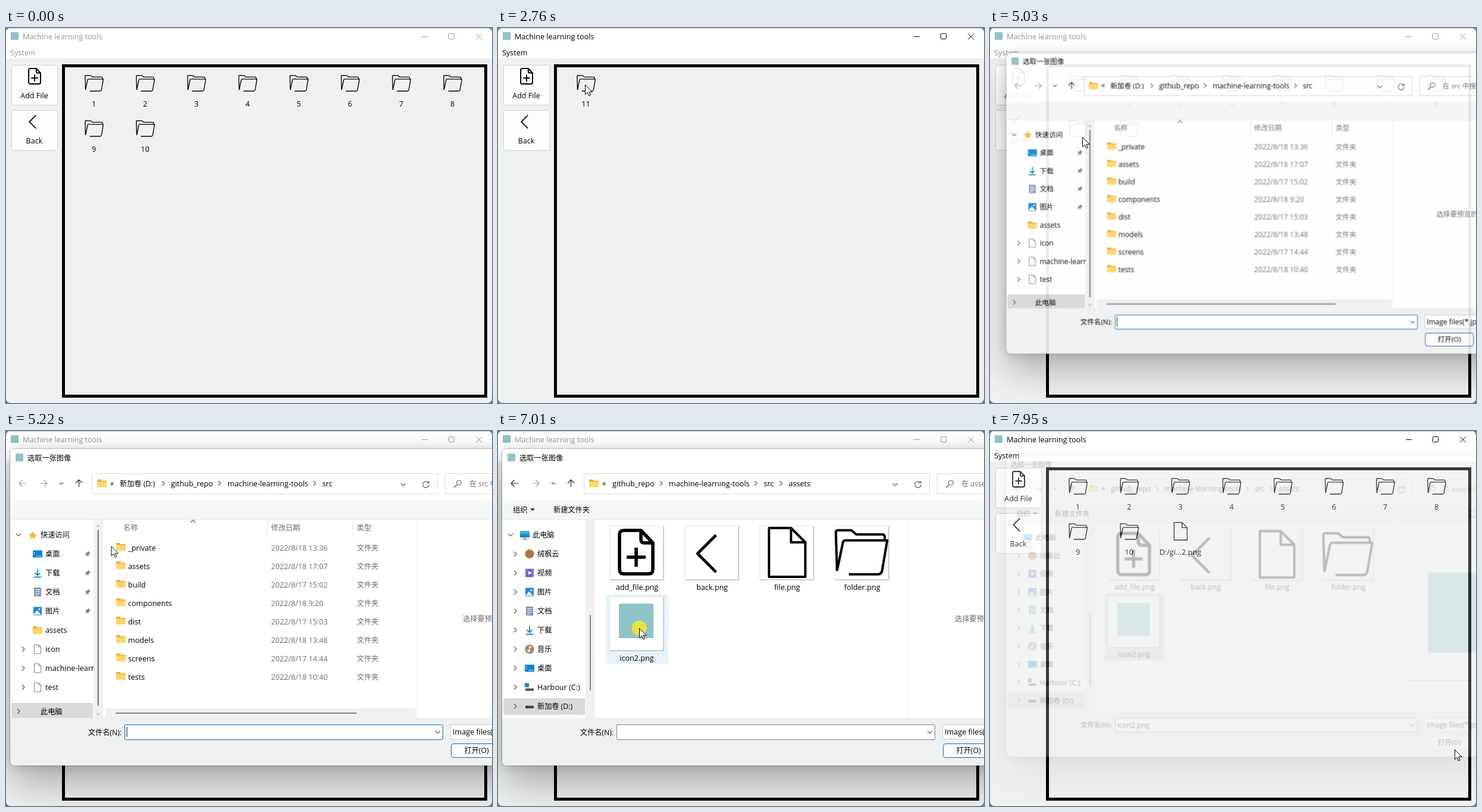
An HTML page that plays this animation: 816x630 px, repeating every 8000 ms.

```html
<!DOCTYPE html>
<html lang="zh-CN">
<head>
<meta charset="utf-8">
<title>Machine learning tools</title>
<style>
html, body { margin: 0; width: 100%; height: 100%; overflow: hidden; background: #71808c; }
#stage { position: relative; width: 100%; height: 100%; overflow: hidden; contain: strict; }
svg { position: absolute; left: 0; top: 0; display: block; }
text { font: 12.6px "Open Sans", "Noto Sans CJK SC", "Noto Sans CJK", sans-serif; fill: #000; white-space: pre; }
text.cjk { font-size: 12.2px; }
text.mid { text-anchor: middle; }
text.end { text-anchor: end; }
text.soft { fill: #6d6d6d; }
.line { fill: none; stroke: #000; stroke-linejoin: round; }
.thin { fill: none; stroke: #5c5c5c; stroke-width: 1.2; }
#win { position: absolute; width: 816px; height: 630px; border-radius: 8px; overflow: hidden; background: #eff1f1; }
#dialog {
  position: absolute; left: 7px; top: 30px; width: 960px; height: 532px;
  border-radius: 8px; overflow: hidden; background: #fff;
  box-shadow: 0 0 0 1px rgba(0,0,0,.2), 0 2px 21px rgba(0,0,0,.17), 0 32px 64px rgba(0,0,0,.28);
  transform-origin: 407px 236px;
}

/* One loop is 8 s, so 1% is 80 ms. */
#dialog, .anim { animation: 8s step-end infinite; }
#dialog { animation-name: dialog; }
@keyframes dialog {
  0% { opacity: 0; transform: scale(.9); }
  62% { opacity: .5; transform: scale(.92); }
  62.875% { opacity: .93; transform: scale(.95); }
  63.75% { opacity: 1; transform: scale(.985); }
  64.5% { opacity: 1; transform: none; }
  98.5% { opacity: .6; transform: scale(.97); }
  99.375% { opacity: .23; transform: scale(.95); }
}
.active { animation-name: active; }
@keyframes active { 0% { opacity: .42; } 8% { opacity: 1; } 61.25% { opacity: .42; } 98.5% { opacity: 1; } }
.top { animation-name: top; }
@keyframes top { 0% { opacity: 1; } 33% { opacity: 0; } 46.125% { opacity: 1; } }
.sub { animation-name: sub; }
@keyframes sub { 0% { opacity: 0; } 33% { opacity: 1; } 46.125% { opacity: 0; } }
.done { animation-name: done; }
@keyframes done { 0% { opacity: 0; } 98.5% { opacity: 1; } }
.undone { animation-name: undone; }
@keyframes undone { 0% { opacity: 1; } 98.5% { opacity: 0; } }
.add { animation-name: add; }
@keyframes add {
  0% { fill: #fdfdfd; stroke: #d0d0d0; }
  52% { fill: #e0eef9; stroke: #0078d4; }
  57.75% { fill: #cce4f7; stroke: #005499; }
  58.7% { fill: #e0eef9; stroke: #0078d4; }
  62% { fill: #fdfdfd; stroke: #d0d0d0; }
}
.back { animation-name: back; }
@keyframes back {
  0% { fill: #fdfdfd; stroke: #d0d0d0; }
  39.25% { fill: #e0eef9; stroke: #0078d4; }
  45.375% { fill: #cce4f7; stroke: #005499; }
  46.25% { fill: #e0eef9; stroke: #0078d4; }
  52% { fill: #fdfdfd; stroke: #d0d0d0; }
}
.early { animation-name: early; }
@keyframes early { 0% { opacity: 1; } 65.4% { opacity: 0; } }
.ready { animation-name: ready; }
@keyframes ready { 0% { opacity: 0; } 65.4% { opacity: 1; } }
.src { animation-name: src; }
@keyframes src { 0% { opacity: 1; } 79.375% { opacity: 0; } }
.assets { animation-name: assets; }
@keyframes assets { 0% { opacity: 0; } 79.375% { opacity: 1; } }
.caret { animation-name: caret; }
@keyframes caret { 0% { opacity: 1; } 69.5% { opacity: 0; } }
.row { animation-name: row; }
@keyframes row { 0% { opacity: 0; } 70% { opacity: 1; } }
.field { animation-name: field; }
@keyframes field { 0% { stroke: #0067c0; } 79.375% { stroke: #868686; } }
.cell { animation-name: cell; }
@keyframes cell { 0% { fill: #fff; } 84.4% { fill: #e5f3ff; } 88.5% { fill: #cce8ff; } 97.6% { fill: #d9d9d9; } }
.prompt { animation-name: prompt; }
@keyframes prompt { 0% { opacity: 1; } 89.4% { opacity: 0; } }
.chosen { animation-name: chosen; }
@keyframes chosen { 0% { opacity: 0; } 89.4% { opacity: 1; } }
.open { animation-name: open; }
@keyframes open {
  0% { fill: #fdfdfd; stroke: #0067c0; }
  95.5% { fill: #e0eef9; stroke: #0067c0; }
  96.75% { fill: #cce4f7; stroke: #0067c0; }
  97.8% { fill: #f8f8f8; stroke: #ececec; }
}

#cursor { animation: move 8s linear infinite; }
@keyframes move {
  0%, 2.24% { transform: translate(860px, 660px); }
  2.25% { transform: translate(703px, 542px); }
  3.875%, 14% { transform: translate(606px, 478px); }
  17.6% { transform: translate(478px, 361px); }
  22% { transform: translate(255px, 182px); }
  24.5% { transform: translate(163px, 108px); }
  26.25%, 35.5% { transform: translate(146px, 95px); }
  38.5% { transform: translate(86px, 140px); }
  41%, 51.1% { transform: translate(46px, 172px); }
  53.5%, 60.5% { transform: translate(44px, 98px); }
  62.875%, 63.7% { transform: translate(155px, 183px); }
  68% { transform: translate(214px, 211px); }
  72.5%, 80.5% { transform: translate(249px, 226px); }
  85.5%, 90.5% { transform: translate(237px, 331px); }
  93% { transform: translate(500px, 433px); }
  95.8%, 100% { transform: translate(780px, 535px); }
}
.press { animation-name: press; }
@keyframes press {
  0% { opacity: 0; }
  7.25% { opacity: .8; } 9.5% { opacity: 0; }
  31.25% { opacity: .8; } 32.1% { opacity: 0; }
  32.8% { opacity: .8; } 33.7% { opacity: 0; }
  45.375% { opacity: .8; } 46.25% { opacity: 0; }
  57.75% { opacity: .8; } 58.7% { opacity: 0; }
  76.1% { opacity: .8; } 77% { opacity: 0; }
  77.9% { opacity: .8; } 78.8% { opacity: 0; }
  86.9% { opacity: .8; } 88.5% { opacity: 0; }
  96.75% { opacity: .8; } 97.8% { opacity: 0; }
}
</style>
</head>
<body>
<div id="stage">
  <div id="win"><svg id="main" width="816" height="630"></svg></div>
  <div id="dialog"><svg id="sheet" width="960" height="532" viewBox="7 30 960 532"></svg></div>
  <svg width="816" height="630">
    <g id="cursor">
      <circle class="anim press" r="12.5" fill="#fbee1c"/>
      <path d="M.5.5V16.8L4.2 13.3 6.7 19 9.2 17.9 6.8 12.3H12Z" fill="#fff" stroke="#000"/>
    </g>
  </svg>
</div>
<script>
const MARK = '#8fc3c8';
const text = (x, y, s, cls = '') =>
  `<text x="${x}" y="${y + 4.5}" class="${cls}${/[\u4e00-\u9fff]/.test(s) ? ' cjk' : ''}">${s}</text>`;
const rect = (x, y, w, h, fill, more = '') =>
  `<rect x="${x}" y="${y}" width="${w}" height="${h}" fill="${fill}" ${more}/>`;
const path = (d, more = 'class="thin"') => `<path d="${d}" ${more}/>`;
const group = (cls, ...parts) => `<g class="anim ${cls}">${parts.join('')}</g>`;
const at = (x, y, s) => `<g transform="translate(${x} ${y})">${s}</g>`;
const each = (list, f) => list.map(f).join('');

const shapes = {
  add: 'M3 10Q3 3 10 3H39L59 24V69Q59 76 52 76H10Q3 76 3 69ZM39 3V18Q39 24 45 24H59M31 32V64M15 48H47',
  back: 'M33 2 2 33 33 64',
  file: 'M3 2H40L64 26V84H3ZM40 2V26H64',
  folder: 'M1.5 25 .8 2Q.8 .8 2 .8H10L13 3.3H28.5Q29.8 3.3 29.9 4.7V6.8M1.5 25 5 8Q5.3 6.8 6.5 6.8H31.4L28.4 24.5Q28 27 26 27H8.5'
};
const icon = (name, x, y, scale, width) =>
  path(shapes[name], `class="line" transform="translate(${x} ${y}) scale(${scale})" stroke-width="${width / scale}"`);

// Main window
const folder = (i, label) => {
  const x = 147.5 + i % 8 * 86, y = 79 + (i >> 3) * 76;
  return icon('folder', x - 15.5, y, 1, 1.35) + text(x, y + 48.5, label, 'mid');
};
const button = (cls, y, label) =>
  `<rect class="anim ${cls}" x="9.5" y="${y}" width="77" height="67" rx="3"/>` + text(47.5, y + 51, label, 'mid');

main.innerHTML =
  rect(0, 0, 816, 51, '#fff') + rect(0, 0, 816, 1, '#b3c3d0') +
  rect(8, 7, 13, 13, MARK) +
  group('active',
    text(28, 14.5, 'Machine learning tools'), text(7, 41, 'System'),
    path('M698 14.5H708M789 9.5 799 19.5M799 9.5 789 19.5', 'class="line"'),
    '<rect class="line" x="743.5" y="9.5" width="9" height="9" rx="1"/>') +
  button('add', 62.5, 'Add File') + button('back', 138.5, 'Back') +
  icon('add', 37, 67, .355, 2) + icon('back', 38.5, 146, .355, 1.7) +
  '<rect class="line" x="96.5" y="63.5" width="709" height="555" stroke-width="5" style="stroke-linejoin:miter"/>' +
  group('top', each([...Array(10).keys()], i => folder(i, i + 1))) +
  group('sub', folder(0, '11')) +
  group('done', icon('file', 308, 153, .36, 1.3), text(319.5, 203.5, 'D:/gi...2.png', 'mid'));

// Small pictures, centred on 0,0
const dot = (r, fill) => `<circle r="${r}" fill="${fill}"/>`;
const pics = {
  folder: path('M-8-5.5Q-8-6.5-7-6.5H-2L0-4.5H7Q8-4.5 8-3.5V5H-8Z', 'fill="#e9ae35"') + rect(-8, -3, 16, 9.5, '#ffd56b', 'rx="1"'),
  pc: rect(-8, -7, 16, 11, '#1c87c9', 'rx="1"') + rect(-8, -7, 16, 5, '#39b2e2', 'rx="1"') + path('M0 4V7M-4 7H4'),
  cloud: dot(7.5, '#b57236'),
  video: rect(-7, -7, 14, 14, '#7a5bd0', 'rx="1"') + path('M-2-3.5V3.5L4 0Z', 'fill="#fff"') + path('M-5.2-6V6M5.2-6V6', 'stroke="#d6cbf5" stroke-dasharray="2 1.6"'),
  image: rect(-7, -7, 14, 14, '#1f87d1', 'rx="1"') + path('M-7 6-1-1 6 6Z', 'fill="#fff"') + '<circle cx="3" cy="-3" r="1.5" fill="#fff"/>',
  doc: rect(-6, -7.5, 12, 15, '#8193b4', 'rx="1"') + path('M-4-4H4M-4-1H4M-4 2H4M-4 5H1', 'stroke="#fff" stroke-width="1.2"'),
  down: path('M0-7V4M-4.5-.5 0 4 4.5-.5M-6 7H6', 'fill="none" stroke="#1689b5" stroke-width="1.8"'),
  music: dot(7.8, '#a9876a') + path('M0 3V-4.5L3.5-3', 'fill="none" stroke="#fff" stroke-width="1.4"') + '<circle cx="-1.6" cy="3" r="2" fill="#fff"/>',
  desk: rect(-8, -6, 16, 12, '#1083cf', 'rx="1"') + path('M-5.5-3V3', 'stroke="#fff" stroke-width="1.5" stroke-dasharray="1.5 1.5"') + path('M-2 3.5H6', 'stroke="#7fd0f5" stroke-width="1.5"'),
  system: rect(-8, -7, 7, 7, '#1c86cc') + rect(-7, 2, 14, 4, '#4a4f55'),
  drive: rect(-7, -1, 14, 4.5, '#3e4247', 'rx="1"'),
  star: path('M0-7 2-2.3 7-1.8 3.3 1.6 4.4 6.6 0 4-4.4 6.6-3.3 1.6-7-1.8-2-2.3Z', 'fill="#f7b52c"'),
  page: path('M-5.5-7.5H2L5.5-4V7.5H-5.5ZM2-7.5V-4H5.5', 'fill="#fff" stroke="#808080"'),
  pin: path('M1-5 5-1 3.5-.5 1.5 2 1 4.5-1.2 2.2-5 5-2.2 1.2-4.5-1-2-1.5.5-3.5Z', 'fill="#858585"')
};
const pic = (name, x, y) => at(x, y, pics[name]);
const chevron = (x, y) => path(`M${x - 2} ${y - 4}l4 4-4 4`);
const caretDown = (x, y, r = 4) => path(`M${x - r} ${y - r / 2}l${r} ${r} ${r}-${r}`);

// Sidebar rows: picture, label, pinned
const branch = ([name, label, pinned], i) => {
  const y = 206.5 + i * 32;
  return pic(name, 53, y) + text(66, y, label) + (pinned ? pic('pin', 137, y) : name === 'folder' ? '' : chevron(29, y));
};
const quick = [['desk', '桌面', 1], ['down', '下载', 1], ['doc', '文档', 1], ['image', '图片', 1],
  ['folder', 'assets'], ['page', 'icon'], ['page', 'machine-learr'], ['page', 'test']];
const places = [['cloud', '绒枫云'], ['video', '视频'], ['image', '图片'], ['doc', '文档'], ['down', '下载'],
  ['music', '音乐'], ['desk', '桌面'], ['system', 'Harbour (C:)'], ['drive', '新加卷 (D:)']];
const sidebar =
  rect(147, 149, 16, 333, '#f1f1f1') +
  group('early',
    path('M151 161 155 156.5 159 161ZM151 474 155 478.5 159 474Z', 'fill="#cfcfcf"'),
    rect(9, 457, 137, 25, '#d9d9d9'), caretDown(21, 174.5), pic('star', 45, 175), text(58, 174.5, '快速访问'),
    each(quick, branch), chevron(21, 471), text(58, 471, '此电脑'), rect(153.5, 166, 2.5, 296, '#858585', 'rx="1"')) +
  group('ready',
    rect(9, 449, 137, 28, '#d9d9d9'), caretDown(21, 174.5), pic('pc', 45, 175), text(58, 174.5, '此电脑'),
    each(places, branch), rect(154, 309, 2, 127, '#858585', 'rx="1"'));

// Title and address bar
const crumbs = (...items) => each(items, ([x, label]) => label === '›' ? chevron(x, 88) : text(x, 88, label));
const leftArrow = color => path('M34 88H22M27.5 82.5 22 88 27.5 93.5', `fill="none" stroke="${color}" stroke-width="1.2"`);
const title = x => text(x, 45.5, '选取一张图像');
const header =
  group('undone', rect(16, 38, 13, 13, MARK), title(36)) + group('done', title(14.5)) +
  group('src', leftArrow('#a3a3a3')) + group('assets', leftArrow('#222')) +
  path('M57 88H69M63.5 82.5 69 88 63.5 93.5', 'fill="none" stroke="#a3a3a3" stroke-width="1.2"') +
  caretDown(93, 88, 3) + path('M122.5 94V82M117 87.5 122.5 82 128 87.5', 'fill="none" stroke="#333" stroke-width="1.3"') +
  rect(144.5, 71.5, 580, 34, '#fff', 'stroke="#d9d9d9"') + rect(737.5, 71.5, 260, 34, '#fff', 'stroke="#d9d9d9"') +
  pic('folder', 161, 88) + text(175, 87, '«') + caretDown(667, 90) +
  path('M709 86.5A5.3 5.3 0 1 0 710.3 90M710 84V87.5H706.5') +
  path('M757 90.5 752 95.5M756.5 87a4 4 0 1 1 8 0 4 4 0 1 1-8 0') +
  group('src',
    crumbs([191, '新加卷 (D:)'], [264, '›'], [277, 'github_repo'], [358.5, '›'], [372, 'machine-learning-tools'], [518, '›'], [531, 'src']),
    text(778, 88.5, '在 src 中搜索', 'soft')) +
  group('src', group('ready', chevron(560, 88))) +
  group('assets',
    crumbs([192, 'github_repo'], [274, '›'], [287, 'machine-learning-tools'], [433, '›'], [446, 'src'], [475, '›'], [488, 'assets']),
    text(778, 88.5, '在 assets 中搜索', 'soft')) +
  rect(7, 117, 960, 32, '#f5f7f7') + rect(7, 148, 960, 1, '#e6e8e8') +
  group('ready', text(25, 132.5, '组织'), path('M54 130H62L58 134.5Z', 'fill="#333"'), text(93, 132.5, '新建文件夹'),
    rect(826, 127, 14, 11, 'none', 'stroke="#555"'));

// File list
const entries = [['_private', '18 13:36'], ['assets', '18 17:07'], ['build', '17 15:02'], ['components', '18 9:20'],
  ['dist', '17 15:03'], ['models', '18 13:48'], ['screens', '17 14:44'], ['tests', '18 10:40']];
const listing = group('src',
  group('row', rect(181, 213, 507, 27, '#e5f3ff')),
  path('M310 153.5l4-4 4 4'), rect(438, 150, 1, 28, '#e2e2e2'), rect(582, 150, 1, 28, '#e2e2e2'),
  text(197, 162.5, '名称', 'soft'), text(445, 162.5, '修改日期', 'soft'), text(589, 162.5, '类型', 'soft'),
  each(entries, ([name, when], i) => {
    const y = 196 + i * 31;
    return pic('folder', 193, y - 1.5) + text(205, y, name) +
      text(445, y, '2022/8/' + when, 'soft') + text(589, y, '文件夹', 'soft');
  }),
  rect(167, 466, 521, 16, '#f0f0f0'), rect(184, 473, 405, 2, '#858585', 'rx="1"'));

// Thumbnails
const card = (x, y, size) => rect(x + 1, y + 1, size + 1, size + 1, '#000', 'opacity=".1"') +
  rect(x + .5, y + .5, size, size, '#fff', 'stroke="#e4e4e4"') +
  path(`M${x + 1} ${y + size + 1}h${size}v${-size}`, 'fill="none" stroke="#b5b5b5"');
const thumbs = group('assets',
  '<rect class="anim cell" x="181" y="274" width="105" height="117.5"/>',
  each(['add_file', 'back', 'file', 'folder'], (name, i) =>
    card(187 + i * 126, 159, 90) + text(233.5 + i * 126, 262, name + '.png', 'mid')),
  icon('add', 201, 164, 1, 5.6), icon('back', 333, 173, 1, 4.6),
  icon('file', 452, 161, 1, 4), icon('folder', 565, 164.5, 2.82, 4),
  card(187, 278, 90), rect(203, 290, 58, 58, MARK), text(233, 381, 'icon2.png', 'mid'));

const preview =
  rect(689, 149, 1, 333, '#f2f2f2') +
  group('prompt', text(767, 315.5, '选择要预览的文件。', 'soft')) +
  group('chosen', card(713, 207, 219), rect(752, 236, 142, 142, MARK));

const footer =
  rect(7, 482, 960, 80, '#eff0f0') + text(194, 506, '文件名(N):', 'end') +
  '<rect class="anim field" x="199.5" y="493.5" width="534" height="25" rx="1" fill="#fff"/>' +
  group('caret', rect(202.5, 497, 1, 17, '#000')) +
  group('chosen', text(203, 506, 'icon2.png')) + caretDown(725, 506) +
  rect(746.5, 493.5, 190, 24, '#fdfdfd', 'stroke="#cfcfcf"') + text(750, 505.5, 'Image files(*.jpg *.png)') +
  '<rect class="anim open" x="747.5" y="525.5" width="85" height="23" rx="4"/>' +
  text(790, 536.5, '打开(O)', 'mid');

sheet.innerHTML = header + sidebar + listing + thumbs + preview + footer;
</script>
</body>
</html>
```
